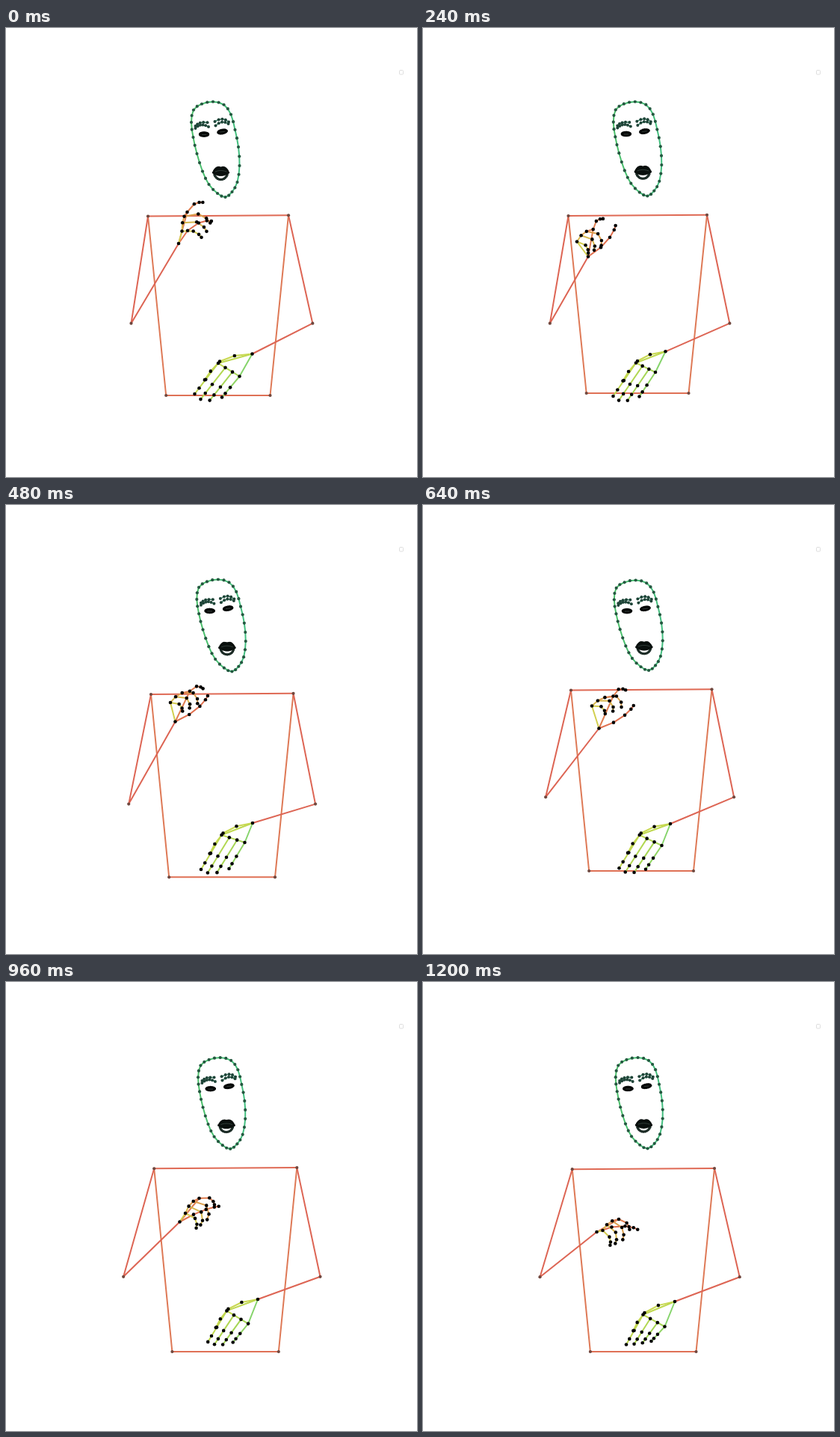
An HTML page with a canvas that plays this animation: 550x600 px, repeating every 1.28 s.

```html
<!DOCTYPE html>
<html lang="en">
<head>
<meta charset="utf-8">
<title>Signing skeleton</title>
<style>
html, body { margin: 0; width: 100%; height: 100%; overflow: hidden; background: #fff; }
canvas { display: block; }
</style>
</head>
<body>
<canvas id="stage" width="550" height="600"></canvas>
<script>
const ctx = document.getElementById('stage').getContext('2d');
const LOOP = 1280, STEP = 80, LAST = 1200;

// A track holds a few poses at set times and blends between neighbours.
class Track {
  constructor() { this.keys = []; }
  at(t, ...v) { this.keys.push({ t, v }); return this; }
  get(t) {
    const k = this.keys;
    let i = 0;
    while (i < k.length - 2 && t >= k[i + 1].t) i++;
    const a = k[i], b = k[i + 1], p = (t - a.t) / (b.t - a.t);
    return a.v.map((n, j) => n + (b.v[j] - n) * p);
  }
}

// Shoulder x left and right, then heights of shoulders, elbows and hips
const body = new Track()
  .at(0, 190, 378, 251.5, 394.7, 491)
  .at(240, 194.5, 380, 251, 394.7, 488)
  .at(480, 194, 384.5, 253, 399.6, 497.3)
  .at(640, 198, 386.5, 247.5, 390.3, 489)
  .at(800, 198, 389, 248.5, 392.5, 493)
  .at(960, 198.2, 389.3, 249.3, 393.8, 494)
  .at(LAST, 199.7, 390, 250.2, 394.2, 494);

// Both wrists
const wrists = new Track()
  .at(0, 231, 288, 329.5, 435.5)
  .at(240, 221, 305.5, 324.5, 432.3)
  .at(480, 226.5, 289.5, 330, 425)
  .at(640, 235.5, 298.5, 331, 426)
  .at(800, 235.5, 313, 334, 423.5)
  .at(960, 232.5, 320.5, 337, 424)
  .at(LAST, 232.5, 334, 337, 427);

// First and last knuckle from the wrist; index angle, finger angle, curl, scale; thumb angle, bend
const raised = new Track()
  .at(0, 11.5, -42, 4.5, -16.5, -49, -10, 38, 0.95, -55, 20)
  .at(240, 6.7, -36.5, -15, -20, -69, 12, 50, 0.78, -36, -12)
  .at(480, 19.5, -40.8, -6.5, -25.5, -35, 0, 55, 0.74, -27, -11)
  .at(640, 19, -43, -9.5, -30, -52, -6, 58, 0.78, -22, -11)
  .at(800, 21, -41.5, 1.5, -22.5, -31, 7, 57, 1.05, -30, 0)
  .at(960, 26, -31.5, 7.5, -11.5, -2, 18, 56, 0.92, -28, 6)
  .at(LAST, 29.5, -17, 8, -2, 25, 34, 42, 0.78, -18, 14);

// First and last knuckle, first and last fingertip from the wrist; bow of the fingertips
const resting = new Track()
  .at(0, -45.5, 12.5, -17, 30, -77, 53.5, -40.5, 58, 7)
  .at(240, -39.5, 15.2, -13.5, 27.7, -70, 59.7, -35, 60.2, 6.8)
  .at(480, -41.5, 16, -10.5, 26, -69, 62, -31.5, 61, 6)
  .at(800, -41, 14, -12.5, 32, -68, 56.5, -34.5, 60.5, 6)
  .at(LAST, -42.5, 17.5, -13.5, 33.5, -65, 57.5, -31.5, 53, 1);

// Centre, top, bottom, lean
const head = new Track()
  .at(0, 280.2, 98.5, 226, 0)
  .at(240, 287, 98.5, 224.5, 0)
  .at(480, 288.1, 99.5, 222.5, 2)
  .at(640, 288.3, 100.5, 221, 1)
  .at(800, 288.5, 102, 224, 0)
  .at(960, 288.4, 101, 223, -3)
  .at(LAST, 289, 101, 222.5, -3.5);

const add = (a, b, k = 1) => [a[0] + b[0] * k, a[1] + b[1] * k];
const mix = (a, b, p) => [a[0] + (b[0] - a[0]) * p, a[1] + (b[1] - a[1]) * p];
const series = (n, fn) => Array.from({ length: n }, (_, i) => fn(i));

function line(points, color, width = 2, close = false) {
  ctx.beginPath();
  points.forEach(p => ctx.lineTo(...p));
  if (close) ctx.closePath();
  ctx.strokeStyle = color;
  ctx.lineWidth = width;
  ctx.stroke();
}
function dots(points, color, r) {
  ctx.fillStyle = color;
  for (const [x, y] of points) {
    ctx.beginPath();
    ctx.arc(x, y, r, 0, 7);
    ctx.fill();
  }
}
function fill(points, color) {
  ctx.beginPath();
  points.forEach(p => ctx.lineTo(...p));
  ctx.fillStyle = color;
  ctx.fill();
}

// Points along a quadratic curve, and along an ellipse with angles in turns
const bend = (a, c, b, n) => series(n, i => {
  const p = i / (n - 1);
  return mix(mix(a, c, p), mix(c, b, p), p);
});
const arc = (cx, cy, rx, ry, from, to, n) => series(n, i => {
  const a = (from + (to - from) * i / (n - 1)) * 2 * Math.PI;
  return [cx + rx * Math.cos(a), cy + ry * Math.sin(a)];
});
// Closed curve through the points, with one more point halfway between each two
const loop = pts => pts.flatMap((p, i) => {
  const at = k => pts[(i + k + pts.length) % pts.length];
  const mid = mix(p, at(1), 0.5);
  return [p, add(mid, add(mid, mix(at(-1), at(2), 0.5), -1), 0.125)];
});

const oval = loop([[277, 98.5], [291.5, 102.5], [301, 115.5], [306.5, 136], [311, 159],
  [312.5, 184], [309.5, 206], [302.5, 219], [293.5, 226], [283, 221], [271.5, 209],
  [263, 191.5], [255.5, 168], [250.5, 146], [248, 126], [251, 109.5], [262, 101.5]]);
const brows = [
  bend([253.5, 134], [261, 126], [271, 132], 6),
  bend([253.5, 131], [258, 125], [269.5, 126.3], 5),
  bend([280.5, 130.5], [289, 122], [297.5, 128], 5),
  bend([279.5, 125], [290, 118], [298, 125.5], 5)
];
const upperLip = [...bend([277.5, 193], [281.5, 184], [287.5, 187.3], 9),
  ...bend([287.5, 187.3], [293.5, 184], [297.5, 193], 9)];
const innerLip = bend([297.5, 193], [287.5, 200], [277.5, 193], 11);
const chin = arc(287.5, 193.5, 8.8, 9, 0.01, 0.49, 13);

function drawHead(t) {
  const [cx, top, bottom, lean] = head.get(t);
  const put = list => list.map(([x, y]) => {
    const v = (y - 98.5) / 127.5;
    return [cx + x - 280.2 + lean * (v - 0.5), top + v * (bottom - top)];
  });

  const green = ctx.createLinearGradient(cx - 32, 0, cx + 32, 0);
  green.addColorStop(0, '#4cc06a');
  green.addColorStop(1, '#43bf80');
  line(put(oval), green, 2, true);
  dots(put(oval), '#245840', 2.1);

  for (const b of brows) {
    line(put(b), '#3f8f70', 1.5);
    dots(put(b), '#1f4438', 2);
  }
  for (const [x, y, tilt] of [[265, 142, 0], [289.5, 138.5, -0.16]]) {
    const lid = arc(x, y, 5.6, 2.4, 0, 1, 17).map(([a, b]) => [a, b + (a - x) * tilt]);
    fill(put(lid), '#050807');
    dots(put(lid), '#050807', 1.6);
    line(put([[x - 3, y + 0.5], [x + 3, y + 0.5 + 4 * tilt]]), '#3a4541', 0.8);
  }

  line(put(chin), '#3f8f70', 1.5);
  dots(put(chin), '#1c2b26', 1.8);
  fill(put([...upperLip, ...innerLip]), '#0a100e');
  dots(put([...upperLip, ...innerLip]), '#0a100e', 1.6);
  line(put(bend([280, 192], [287.5, 189], [295, 192], 7)), '#3a4843', 0.8);
}

// Joints of a finger: bones laid end to end, each with its own angle in degrees
function chain(from, bones, angles) {
  let p = from;
  return bones.map((len, i) => {
    const a = angles[i] * Math.PI / 180;
    return p = add(p, [len * Math.cos(a), len * Math.sin(a)]);
  });
}

const bones = [[15, 7.5, 5], [20, 13, 8.5], [20, 12.5, 7], [16, 9, 5.5]];
const spread = [0, 0, 7, 10];

function raisedHand(t) {
  const [kx, ky, px, py, index, angle, curl, size, thumb, turn] = raised.get(t);
  const fingers = bones.map((set, f) => {
    const inner = f === 1 || f === 2;
    const knuckle = add(mix([kx, ky], [px, py], f / 3), inner ? [-1.6, -2.7] : [0, 0]);
    const a = f ? angle + spread[f] : index, c = inner ? curl : curl * 0.8;
    return [knuckle, ...chain(knuckle, set.map(n => n * size), [a, a + c, a + c * 1.6])];
  });
  const turns = series(4, i => thumb + turn * i);
  return [chain([0, 0], [21, 18, 11.5, 6], turns), ...fingers];
}

function restingHand(t) {
  const [kx, ky, px, py, ax, ay, bx, by, bow] = resting.get(t);
  const k = [kx, ky], tip = [ax, ay];
  const fingers = series(4, f => {
    const knuckle = mix(k, [px, py], f / 3);
    const out = f === 1 || f === 2 ? bow : 0;
    const end = add(mix(tip, [bx, by], f / 3), [-0.6, 0.8], out);
    return [0, 0.53, 0.81, 1].map(p => mix(knuckle, end, p));
  });
  const thumb = [[kx * 0.52, ky * 0.52 - 4], [kx + 2, ky - 2.5],
    add(mix(k, tip, 0.26), [-2, 0]), add(mix(k, tip, 0.54), [-1, 0])];
  return [thumb, ...fingers];
}

function drawHand(hand, wrist, ink, edge) {
  const fingers = hand.map(f => f.map(p => add(p, wrist)));
  line([wrist, fingers[0][0]], ink[0]);
  line([wrist, fingers[1][0]], ink[1]);
  line([wrist, fingers[4][0]], edge);
  fingers.forEach((f, i) => {
    line(f, ink[i]);
    if (i > 1) line([fingers[i - 1][0], f[0]], ink[i - 1]);
  });
  dots([wrist, ...fingers.flat()], '#000', 2.3);
}

const warm = ['#e0704f', '#e07f52', '#dca04f', '#d8b84f', '#d4cc50'];
const lime = ['#c8d850', '#bfd850', '#b2d852', '#a6d656', '#90d464'];

function draw(t) {
  ctx.fillStyle = '#fff';
  ctx.fillRect(0, 0, 550, 600);
  ctx.lineJoin = ctx.lineCap = 'round';

  ctx.beginPath();
  ctx.roundRect(526.5, 56.5, 5, 5.5, 1);
  ctx.strokeStyle = '#dedede';
  ctx.lineWidth = 1;
  ctx.stroke();

  const p = t / LAST, ease = p * p * (3 - 2 * p);
  const [ax, bx, top, mid, low] = body.get(t);
  const [wax, way, wbx, wby] = wrists.get(t);
  const sa = [ax, top], sb = [bx, top - 1.2];
  const ea = [ax - 22.5 - 20.7 * ease, mid], eb = [bx + 29.5 + 3.5 * (2 * p - 0.9) ** 2, mid];
  const ha = [ax + 24.2, low], hb = [bx - 24.5, low];
  const wa = [wax, way], wb = [wbx, wby];

  line([sa, ha], '#de7956');
  line([sb, hb], '#de7956');
  line([ha, hb], '#df7156');
  line([sa, sb], '#df6a55');
  line([sa, ea, wa], '#dd6554');
  line([sb, eb, wb], '#dd6554');
  dots([sa, sb, ea, eb, ha, hb], '#70483f', 2.1);

  drawHead(t);
  drawHand(raisedHand(t), wa, warm, '#d2cf50');
  drawHand(restingHand(t), wb, lime, '#86d46c');
}

const start = performance.now();
function tick() {
  const t = (performance.now() - start) % LOOP;
  draw(Math.floor(t / STEP) * STEP);
  requestAnimationFrame(tick);
}
tick();
</script>
</body>
</html>
```
